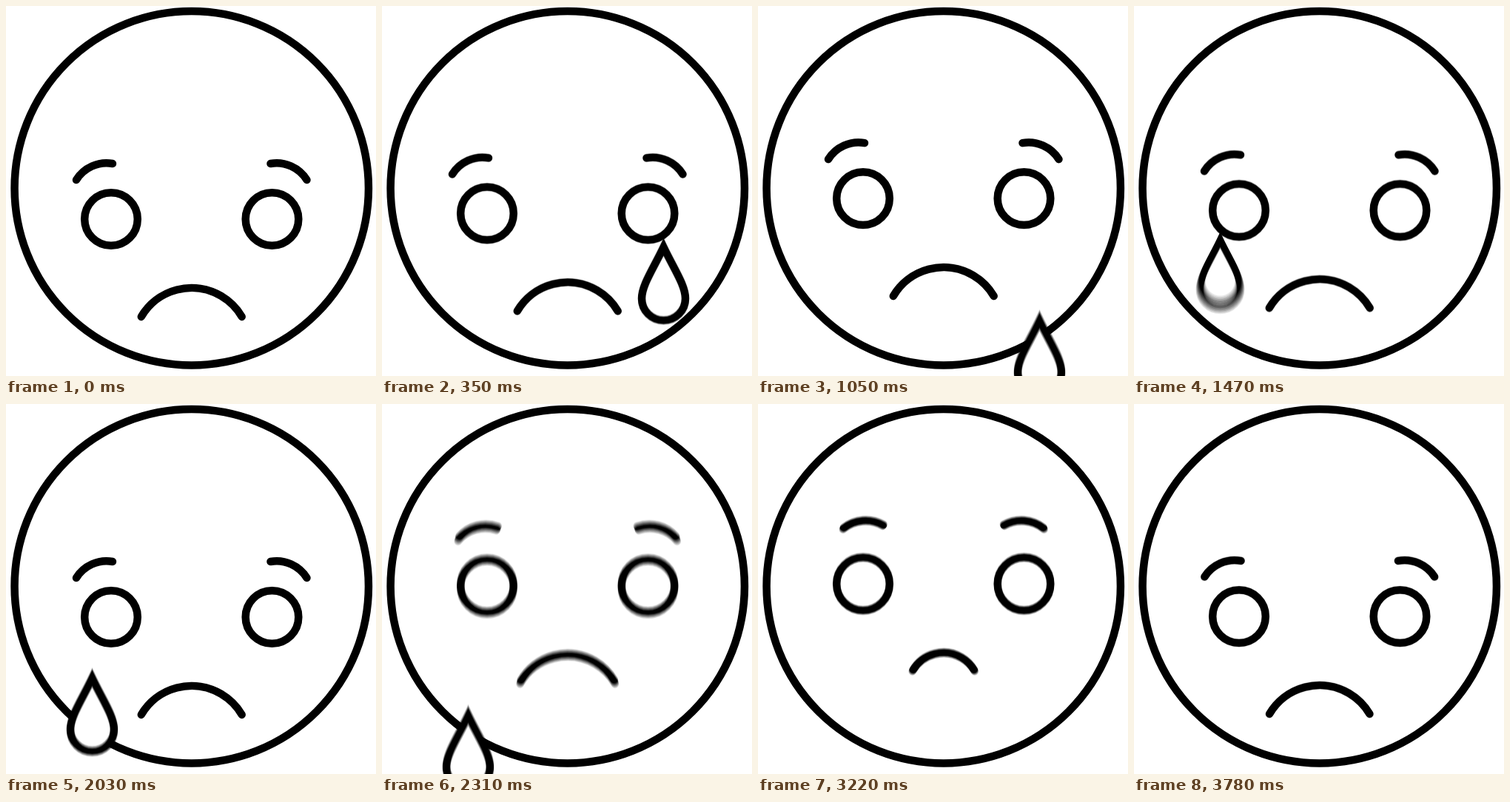
Recreate the animation shown at these times as an HTML page with a canvas. Size 500 by 500 pixels, loop 3.85 s.

```html
<!DOCTYPE html>
<html lang="en">
<head>
<meta charset="utf-8">
<title>Sad face</title>
<style>
  html, body { margin: 0; width: 100%; height: 100%; overflow: hidden; background: #fff; }
  canvas { display: block; width: 500px; height: 500px; }
</style>
</head>
<body>
<canvas id="stage" width="500" height="500"></canvas>
<script>
const SIZE = 500, LOOP = 3850, STEP = 70;
const SHUTTER = 34, SAMPLES = 12;
const MID = 250.75;

const out = document.getElementById('stage').getContext('2d');
const layer = document.createElement('canvas');
layer.width = layer.height = SIZE;
const ctx = layer.getContext('2d');

// [time, value] pairs, eased in and out between neighbours
const lift = [[0, 0], [1020, -28], [1835, 0], [2030, 0], [2520, -69.3], [2800, -69.3], [3850, 0]];
const browTurn = [[2070, 0], [2640, 24.2], [2980, 24.2], [3850, 0]];
const mouthSize = [[2100, 1], [2970, 0.56], [3060, 0.56], [3820, 1]];
const eyeOpen = [[575, 1], [755, 0.1], [935, 1]];
const tearGrow = [[15, 0], [235, 1]];
const tears = [{ x: 380.5, start: 0 }, { x: 116.5, start: 1280 }];

const brow = new Path2D('M95 235A48 48 0 0 1 144 213');
const drop = new Path2D('M0 12.5C-14 42-29.5 64-29.5 82A29.5 29.5 0 0 0 29.5 82C29.5 64 14 42 0 12.5Z');

function track(keys, t) {
  if (t <= keys[0][0]) return keys[0][1];
  for (let i = 1; i < keys.length; i++) {
    const [t0, a] = keys[i - 1], [t1, b] = keys[i];
    if (t < t1) {
      const p = (t - t0) / (t1 - t0);
      return a + (b - a) * p * p * (3 - 2 * p);
    }
  }
  return keys[keys.length - 1][1];
}

function group(draw) {
  ctx.save();
  draw();
  ctx.restore();
}

function ring(x, y, r) {
  ctx.beginPath();
  ctx.arc(x, y, r, 0, Math.PI * 2);
  ctx.stroke();
}

function eyeAndBrow(t) {
  group(() => {
    ctx.translate(142, 288);
    ctx.scale(1, track(eyeOpen, t));
    ring(0, 0, 35.8);
  });
  group(() => {
    ctx.translate(169, 283);
    ctx.rotate(track(browTurn, t) * Math.PI / 180);
    ctx.translate(-169, -283);
    ctx.stroke(brow);
  });
}

function mouth(t) {
  const r = 78.8 * track(mouthSize, t), half = 1.04, up = -Math.PI / 2;
  ctx.beginPath();
  ctx.arc(MID, 381 + r, r, up - half, up + half);
  ctx.stroke();
}

function tear({ x, start }, t) {
  const age = t - start, size = track(tearGrow, age);
  if (size <= 0) return;
  const fall = Math.max(0, age - 200);
  const y = 305 + 0.04 * fall + 0.000102 * fall * fall;
  if (y > SIZE) return;
  group(() => {
    ctx.translate(x, y);
    ctx.scale(size, size);
    ctx.lineCap = 'butt';
    ctx.fill(drop);
    ctx.stroke(drop);
  });
}

function scene(t) {
  ctx.fillStyle = '#fff';
  ctx.fillRect(0, 0, SIZE, SIZE);
  ctx.strokeStyle = '#000';
  ctx.lineWidth = 10.5;
  ctx.lineCap = 'round';
  ring(MID, 246.25, 239.2);
  group(() => {
    ctx.translate(0, track(lift, t));
    eyeAndBrow(t);
    mouth(t);
    ctx.translate(2 * MID, 0);
    ctx.scale(-1, 1);
    eyeAndBrow(t);
  });
  tears.forEach(item => tear(item, t));
}

// Average several moments for motion blur
function render(t) {
  for (let i = 0; i < SAMPLES; i++) {
    scene(t + SHUTTER * ((i + 0.5) / SAMPLES - 0.5));
    out.globalAlpha = 1 / (i + 1);
    out.drawImage(layer, 0, 0);
  }
}

const begin = performance.now();
let shown = -1;

function tick() {
  const t = Math.floor((performance.now() - begin) % LOOP / STEP) * STEP;
  if (t !== shown) render(shown = t);
  requestAnimationFrame(tick);
}
tick();
</script>
</body>
</html>
```
